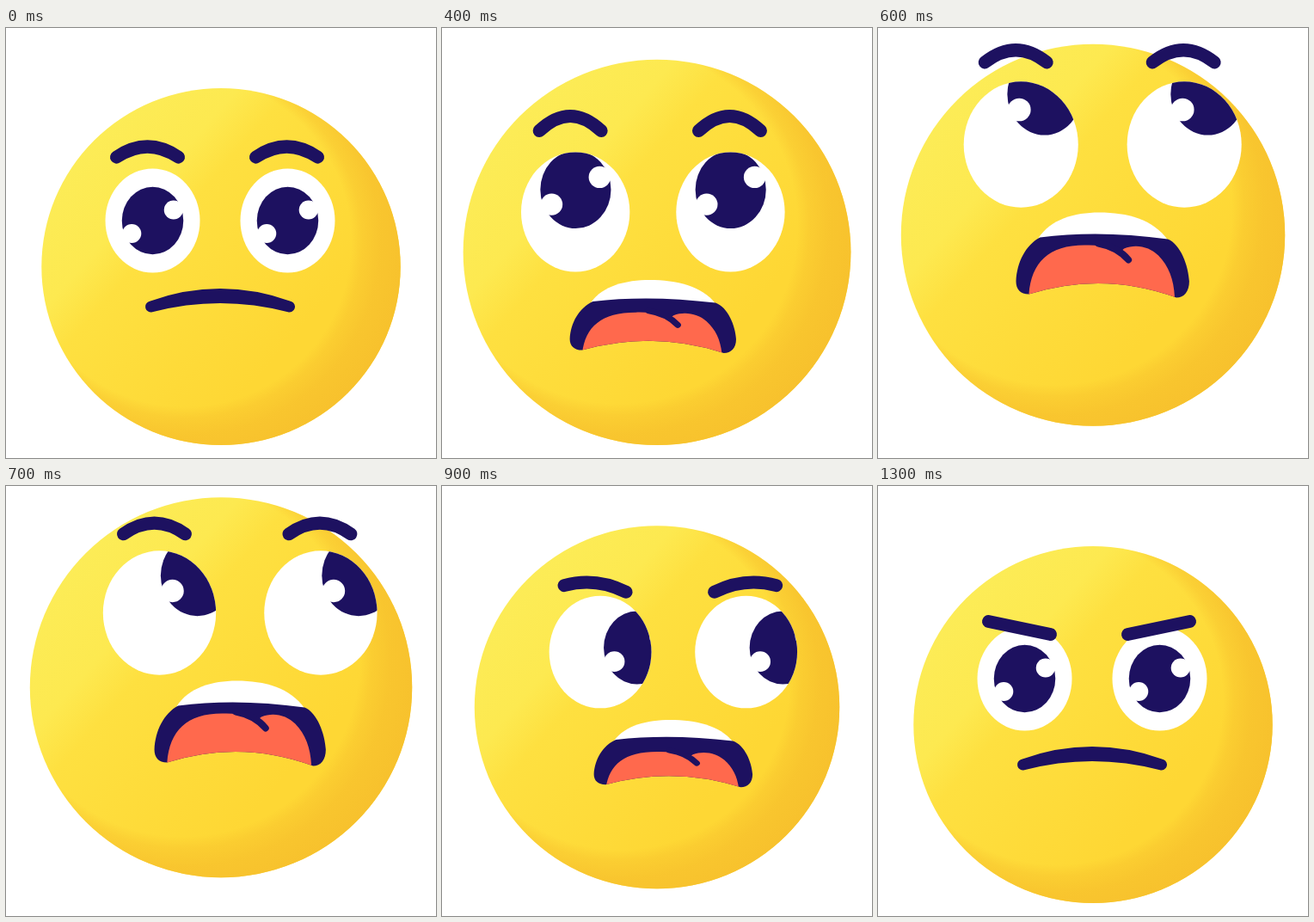
Write an HTML page with a canvas that moves like this. It is 500 px wide and 500 px high and loops after 1600 ms.

```html
<!DOCTYPE html>
<html lang="en">
<head>
<meta charset="utf-8">
<title>Emoji rolling its eyes</title>
<style>
  html, body { margin: 0; width: 100%; height: 100%; overflow: hidden; background: #fff; }
  canvas { display: block; width: 100vw; height: 100vh; }
</style>
</head>
<body>
<canvas id="stage" width="500" height="500"></canvas>
<script>
const ctx = document.getElementById('stage').getContext('2d');
const LOOP = 1600, STEP = 100;
const NAVY = '#1d1160', TONGUE = '#ff694d';

// Key points: [time, value]
const LOOK_X = [[200, 249], [400, 245.3], [600, 261.2], [800, 283.2], [1000, 254.5], [1200, 249]];
const LOOK_Y = [[100, 224], [200, 278.5], [400, 214], [600, 135.5], [800, 159.5], [1000, 226.5], [1200, 224]];
const SWELL = [[100, 0], [200, 7], [500, 21.5], [600, 14.5], [700, 13.5], [800, 7], [1000, 0]];
const BROW_LIFT = [[100, 27], [200, 0], [400, 38], [800, 25], [1000, 6], [1200, 0]];

const clamp = v => Math.min(1, Math.max(0, v));

function ease(t, from, to) {
  const u = clamp((t - from) / (to - from));
  return u * u * (3 - 2 * u);
}

const bump = (t, from, to, skew = 1) =>
  Math.sin(Math.PI * Math.pow(clamp((t - from) / (to - from)), skew));

function along(points, t) {
  const i = points.findIndex(p => p[0] > t);
  if (i === 0) return points[0][1];
  if (i < 0) return points[points.length - 1][1];
  const [t0, a] = points[i - 1], [t1, b] = points[i];
  return a + (b - a) * (t - t0) / (t1 - t0);
}

// The whole expression follows from a few signals.
function poseAt(t) {
  const squint = clamp(1 - Math.abs(t - 200) / 100);
  const grow = 0.21 * bump(t, 200, 1000);
  const roll = Math.PI / 2 * (1 - ease(t, 370, 1000));
  const reach = 0.9 * ease(t, 240, 600) * (1 - ease(t, 800, 1150));
  return {
    squint,
    x: along(LOOK_X, t),
    y: along(LOOK_Y, t),
    scale: 1 + grow,
    swell: along(SWELL, t),
    hop: 30 * bump(t, 500, 1020, 0.8),
    gazeX: reach * Math.cos(roll),
    gazeY: -reach * Math.sin(roll),
    lift: along(BROW_LIFT, t),
    tilt: 4 * squint + 7.5 * ease(t, 700, 1100),
    open: ease(t, 200, 480) * (1 - ease(t, 800, 1080)),
    mouthWidth: 174 * (1 + 0.75 * grow - 0.11 * squint)
  };
}

function oval(x, y, rx, ry, fill) {
  ctx.beginPath();
  ctx.ellipse(x, y, rx, ry, 0, 0, Math.PI * 2);
  ctx.fillStyle = fill;
  ctx.fill();
}

function gradient(g, stops) {
  stops.forEach(([at, colour]) => g.addColorStop(at, colour));
  return g;
}

// Quadratic curve through a given middle point.
function arcTo(x0, y0, mx, my, x1, y1) {
  ctx.quadraticCurveTo(2 * mx - (x0 + x1) / 2, 2 * my - (y0 + y1) / 2, x1, y1);
}

function drawFace({ swell, hop }) {
  const rx = 208.7 + swell, ry = 207.5 + swell;
  ctx.save();
  ctx.translate(250, 485 - hop - ry);
  ctx.scale(rx, ry);
  oval(0, 0, 1, 1, gradient(ctx.createLinearGradient(-0.8, -0.65, 0.4, 0.4), [
    [0, '#fcec57'], [0.28, '#fde950'], [0.42, '#fee040'], [1, '#fed734']
  ]));
  oval(0, 0, 1, 1, gradient(ctx.createRadialGradient(-0.2, -0.14, 0, -0.2, -0.14, 1.25), [
    [0.74, 'rgba(247,193,45,0)'], [0.79, 'rgba(247,193,45,0.45)'],
    [0.87, 'rgba(247,193,45,0.8)'], [1, 'rgba(247,193,45,1)']
  ]));
  ctx.restore();
}

function drawEye(side, { x, y, scale, squint, gazeX, gazeY }) {
  const rx = 55 * scale, ry = rx * 1.1 * (1 - 0.11 * squint);
  ctx.save();
  ctx.translate(x + side * rx * 1.427, y);
  ctx.scale(rx, ry);
  oval(0, 0, 1, 1, '#fff');
  ctx.clip();
  ctx.translate(gazeX, gazeY);
  ctx.scale(0.65, 0.65);
  oval(0, 0, 1, 1, NAVY);
  oval(0.68, -0.32, 0.31, 0.28, '#fff');
  oval(-0.68, 0.38, 0.31, 0.28, '#fff');
  ctx.restore();
}

function drawBrow(side, { x, y, scale, lift, tilt }) {
  const mx = x - 3.5 + side * (78.5 * scale + 2.5);
  const my = y - (60 + lift) * scale + 1;
  const end = my + 0.45 * lift, lean = side * tilt;
  ctx.beginPath();
  ctx.moveTo(mx - 36, end + lean);
  arcTo(mx - 36, end + lean, mx, my, mx + 36, end - lean);
  ctx.strokeStyle = NAVY;
  ctx.lineWidth = 15;
  ctx.stroke();
}

function drawClosed({ x, open, squint, mouthWidth }, top, height) {
  const width = 13 - 5.5 * squint, teeth = 30 * open;
  const half = (mouthWidth - 13) / 2, end = top + height - 7;
  const upper = top + teeth + width / 2, lower = upper + 4 + teeth;
  if (teeth > 0) {
    const w = half * 0.74, y = upper + (end - upper) * 0.55 - width / 2 + 1;
    ctx.beginPath();
    ctx.moveTo(x - w, y);
    arcTo(x - w, y, x, top, x + w, y);
    ctx.fillStyle = '#fff';
    ctx.fill();
  }
  ctx.beginPath();
  ctx.moveTo(x - half, end);
  arcTo(x - half, end, x, upper, x + half, end);
  arcTo(x + half, end, x, lower, x - half, end);
  ctx.closePath();
  ctx.fillStyle = ctx.strokeStyle = NAVY;
  ctx.lineWidth = width;
  ctx.fill();
  ctx.stroke();
}

// Shapes of the open mouth, laid out in a 202 by 99 box.
const teethShape = new Path2D('M26 30C40 8 68 0 97 0C130 0 160 8 177 32Q97 36 26 30Z');
const lipShape = new Path2D('M28 29Q97 20 177 31C192 37 201 62 202 80' +
  'C202 92 196 99 187 99Q102 68 15 95C5 95 0 89 0 80C1 58 11 38 28 29Z');
const tongueShape = new Path2D('M15 110V95C18 58 38 38 80 38C102 37 113 43 124 49' +
  'Q121 45 126 42C140 36 156 40 166 50C178 62 184 78 185 98V110Z');
const creaseShape = new Path2D('M96 36Q118 40 131 55');

function drawOpen({ x, open, mouthWidth }, top, height) {
  ctx.save();
  ctx.translate(x - mouthWidth / 2, top);
  ctx.scale(mouthWidth / 202, height / 99);
  ctx.fillStyle = '#fff';
  ctx.fill(teethShape);
  ctx.fillStyle = NAVY;
  ctx.fill(lipShape);
  ctx.clip(lipShape);
  ctx.translate(0, 30 * (1 - open));
  ctx.fillStyle = TONGUE;
  ctx.fill(tongueShape);
  ctx.strokeStyle = NAVY;
  ctx.lineWidth = 8;
  ctx.stroke(creaseShape);
  ctx.restore();
}

function draw(t) {
  const pose = poseAt(t);
  ctx.fillStyle = '#fff';
  ctx.fillRect(0, 0, 500, 500);
  ctx.lineCap = ctx.lineJoin = 'round';

  drawFace(pose);
  for (const side of [-1, 1]) {
    drawEye(side, pose);
    drawBrow(side, pose);
  }
  const drawMouth = pose.open > 0.25 ? drawOpen : drawClosed;
  drawMouth(pose, pose.y + 79 - 7 * pose.squint, 28 + 71 * pose.open);
}

const start = performance.now();
function tick() {
  const t = (performance.now() - start) % LOOP;
  draw(Math.floor(t / STEP) * STEP);
  requestAnimationFrame(tick);
}
tick();
</script>
</body>
</html>
```
